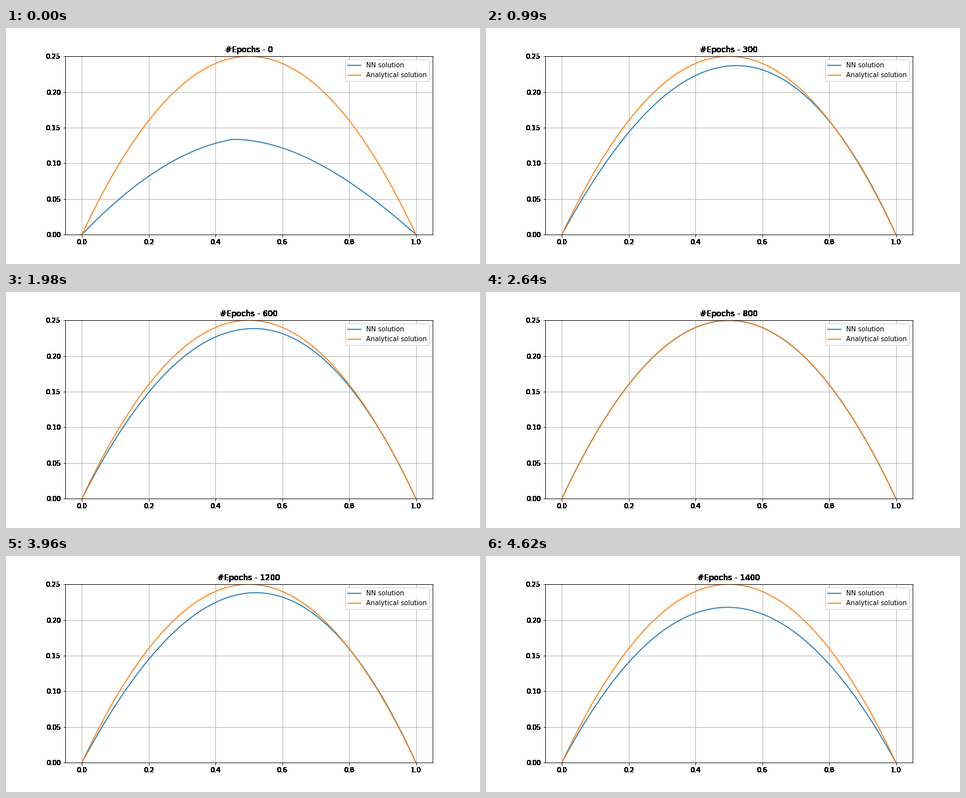
A matplotlib script for the animation above (4950 ms loop, 720 by 360 pixels).

```python
import numpy as np
import matplotlib.pyplot as plt
from matplotlib.animation import FuncAnimation

FRAMES = 15
INTERVAL = 330
STEP = 100       # epochs per frame
OVERPRINT = 60   # repeated drawing hardens the text edges

# Key epochs and the network output there at x = 0, at the ReLU bend and at x = 1
KEYS = {
    0: (0.489, 0.539, 0.416),
    100: (0.80, 0.87, 0.96),
    300: (0.864, 0.938, 1.03),
    600: (0.918, 0.948, 1.007),
    700: (1.0, 0.999, 0.997),
    1000: (1.0, 1.0, 1.0),
    1200: (0.874, 0.944, 1.03),
    1400: (0.884, 0.872, 0.857),
}
BENDS = (0, 0.453, 1)

x = np.linspace(0, 1, 200)
bubble = x * (1 - x)


def trial_solution(epoch):
    knots = [np.interp(epoch, list(KEYS), level)
             for level in zip(*KEYS.values())]
    return bubble * np.interp(x, BENDS, knots)


def overprint(text):
    draw_once = text.draw

    def draw(renderer):
        for _ in range(OVERPRINT):
            draw_once(renderer)

    text.draw = draw


plt.rcParams["font.family"] = "DejaVu Sans"
fig = plt.figure(figsize=(10, 5), dpi=72, facecolor="white")
ax = fig.add_axes([0.125, 0.125, 0.775, 0.755])
ax.set_xlim(-0.05, 1.05)
ax.set_ylim(0, 0.25)
ax.set_xticks(np.arange(0, 1.01, 0.2))
ax.set_yticks(np.arange(0, 0.26, 0.05))
ax.grid(True)
nn_line, = ax.plot(x, trial_solution(0), color="C0", label="NN solution")
ax.plot(x, bubble, color="C1", label="Analytical solution")
ax.legend(loc="upper right")

for label in [ax.title, *ax.get_xticklabels(), *ax.get_yticklabels()]:
    overprint(label)


def update(i):
    epoch = i * STEP
    nn_line.set_ydata(trial_solution(epoch))
    ax.set_title(f"#Epochs - {epoch}")
    return [nn_line]


anim = FuncAnimation(fig, update, frames=FRAMES, interval=INTERVAL,
                     init_func=lambda: update(0), repeat=True,
                     repeat_delay=0, blit=False)
plt.show()
```
